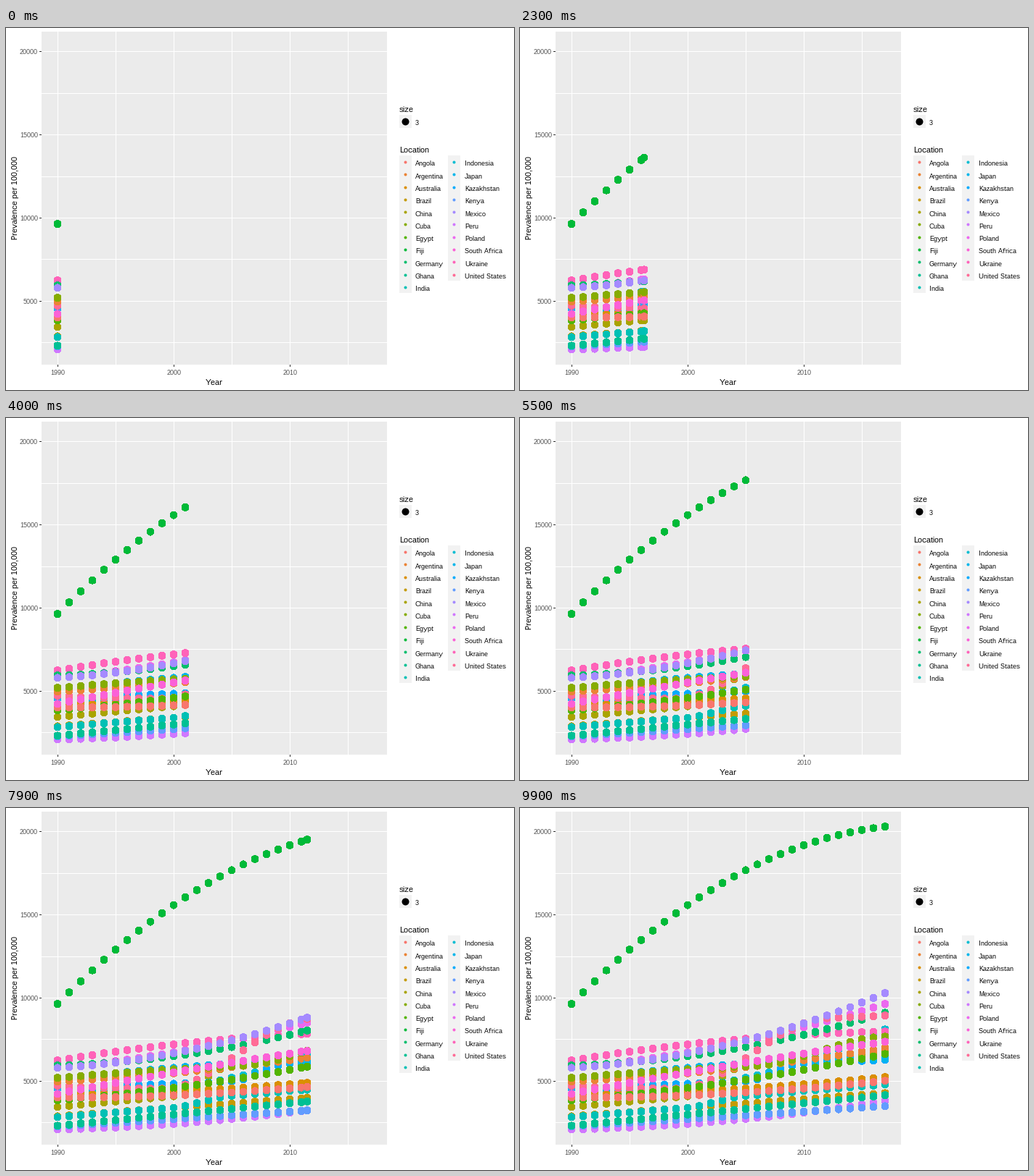
Animation, 700 px wide and 500 px high, one loop 10000 ms. Source, as a matplotlib script:

```python
import numpy as np
import matplotlib.pyplot as plt
from matplotlib.animation import FuncAnimation
from matplotlib.patches import Rectangle

FRAMES, INTERVAL = 100, 100
PT = 0.72  # points per pixel at 100 dpi
DOT, KEY_DOT = 10, 4
FIRST, LAST = 1990, 2017
YEARS = np.arange(FIRST, LAST + 1)

plt.rcParams.update({
    "font.family": "Liberation Sans",
    "text.hinting": "native",
    "text.hinting_factor": 1,
})


def to_x(year):
    return 71 + 16 * (year - FIRST)


def to_y(value):
    return 492.2 - value / 43.53


def hcl(hue, chroma=100, lum=65):
    """Polar LUV colour to sRGB."""
    h = np.radians(hue)
    y = ((lum + 16) / 116) ** 3
    u = chroma * np.cos(h) / (13 * lum) + 0.1978398
    v = chroma * np.sin(h) / (13 * lum) + 0.4683363
    x = 9 * y * u / (4 * v)
    z = -x / 3 - 5 * y + 3 * y / v
    lin = np.array([
        3.240479 * x - 1.537150 * y - 0.498535 * z,
        -0.969256 * x + 1.875992 * y + 0.041556 * z,
        0.055648 * x - 0.204043 * y + 1.057311 * z,
    ]).clip(0, 1)
    return np.where(lin > 0.00304, 1.055 * lin ** (1 / 2.4) - 0.055, 12.92 * lin)


def growth(start, end, bend=0, surge=0, when=2000, span=5):
    """Steady drift with a parabolic bend and one eased surge."""
    s = (YEARS - FIRST) / (LAST - FIRST)
    e = np.clip((YEARS - when) / span, 0, 1)
    return (start + (end - start - surge) * s + 4 * bend * s * (1 - s)
            + surge * e * e * (3 - 2 * e))


# Listed back to front.
PREVALENCE = {
    "China": growth(3450, 6720, surge=1520),
    "Indonesia": growth(4560, 8110, -1350),
    "Fiji": growth(9635, 20300, 2150),
    "Kazakhstan": growth(4560, 6280, surge=960, when=2005),
    "Poland": growth(5800, 9635, -520),
    "Ukraine": growth(6240, 7980, 350),
    "Japan": growth(5110, 6370, 240),
    "Australia": growth(4190, 5240, -200),
    "Germany": growth(5935, 9110, -650),
    "United States": growth(4715, 8940, -220, surge=4140, when=1999, span=13),
    "Argentina": growth(4980, 6980, -250),
    "Cuba": growth(5195, 7675, 175, surge=1520, when=2006, span=11),
    "Peru": growth(2100, 3800, -320),
    "Mexico": growth(5800, 10290, -850),
    "Brazil": growth(2885, 4280),
    "Egypt": growth(3845, 6630, -300),
    "India": growth(2840, 4800, surge=435),
    "Angola": growth(4020, 5020, -260),
    "Kenya": growth(2275, 3495),
    "South Africa": growth(4235, 7370, 130),
    "Ghana": growth(2320, 4150),
}
NAMES = sorted(PREVALENCE)
HUES = {n: hcl(15 + 360 * i / len(NAMES)) for i, n in enumerate(NAMES)}
COLORS = np.array([HUES[n] for n in PREVALENCE])
HEIGHTS = to_y(np.array(list(PREVALENCE.values())))
# Each year lands on a whole frame; the leading dots glide in between.
MARKS = np.round((FRAMES - 1) * (YEARS - FIRST) / (LAST - FIRST))

fig = plt.figure(figsize=(7, 5), dpi=100, facecolor="white")
ax = fig.add_axes([0, 0, 1, 1])
ax.set(xlim=(0, 700), ylim=(500, 0))
ax.axis("off")


def box(x, y, w, h, color):
    ax.add_patch(Rectangle((x, y), w, h, fc=color, lw=0, antialiased=False))


def label(x, y, text, size=9, color="black", **kw):
    kw = {"ha": "left", "va": "center_baseline", **kw}
    ax.text(x, y, text, fontsize=size * PT, color=color, **kw)


def dots(x, y, size, color, z=3):
    return ax.scatter(x, y, s=(size * PT) ** 2, c=color, linewidths=0,
                      antialiased=False, zorder=z)


# Panel, grid and axes
GRAY, DARK, KEY = "#4D4D4D", "#333333", "#F2F2F2"
box(49, 5, 476, 460, "#EBEBEB")
for year in range(1990, 2016, 5):
    x = to_x(year)
    box(x, 5, 1, 460, "white")
    if year % 10 == 0 and year < 2015:
        box(x, 465, 1, 3, DARK)
        label(x + 0.5, 475.5, str(year), color=GRAY, ha="center")
for value in range(2500, 20001, 2500):
    y = round(to_y(value) - 0.5)
    box(49, y, 476, 1, "white")
    if value % 5000 == 0:
        box(46, y, 3, 1, DARK)
        label(44, y + 0.5, str(value), color=GRAY, ha="right")
label(287, 489, "Year", 11, ha="center")
label(13, 235, "Prevalence per 100,000", 11, ha="center", va="center", rotation=90)

# Legends
label(542, 112, "size", 11)
box(542, 120, 17, 18, KEY)
dots([550], [129], DOT, "black")
label(564, 131, "3")
label(542, 167.5, "Location", 11)
box(542, 176, 17, 190, KEY)
box(609, 176, 17, 173, KEY)
for i, name in enumerate(NAMES):
    col, row = divmod(i, 11)
    y = 185 + 17.28 * row
    dots([550 + 67 * col], [round(y)], KEY_DOT, [HUES[name]])
    label(564 + 68 * col, y + 2, name)

trail = dots([], [], DOT, None, 4)


def update(frame):
    now = np.interp(frame, MARKS, YEARS)
    past = YEARS <= now
    years, ys = YEARS[past], HEIGHTS[:, past]
    if now > years[-1]:
        years = np.append(years, now)
        lead = [np.interp(now, YEARS, row) for row in HEIGHTS]
        ys = np.column_stack([ys, lead])
    # Year by year, so the leading dots lie on top.
    xs = np.repeat(to_x(years), len(ys))
    trail.set_offsets(np.column_stack([xs, ys.T.ravel()]))
    trail.set_facecolors(np.tile(COLORS, (len(years), 1)))
    return (trail,)


anim = FuncAnimation(fig, update, frames=FRAMES, interval=INTERVAL,
                     repeat=True, repeat_delay=0)
plt.show()
```
